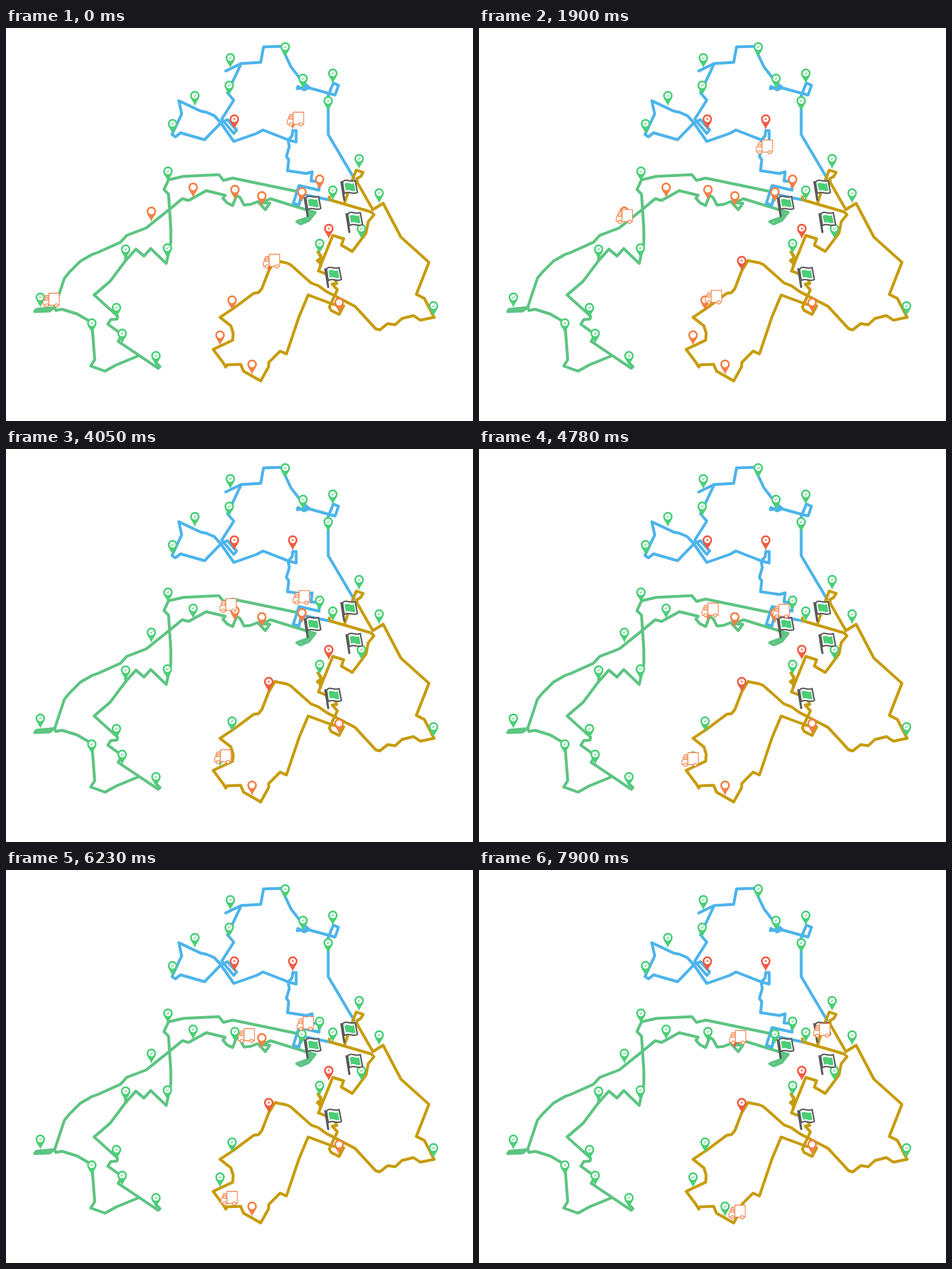
Write an HTML page that moves like this. It is 816 by 686 pixels and loops after 8 s.

```html
<!DOCTYPE html>
<html lang="en">
<head>
<meta charset="utf-8">
<title>Delivery routes</title>
<style>
  html, body { margin: 0; width: 100%; height: 100%; overflow: hidden; background: #fff; }
  svg { display: block; width: 100%; height: 100%; }
  .road { fill: none; stroke-width: 5; stroke-linejoin: round; stroke-linecap: round; }
  .blue { stroke: #4db4eb; }
  .green { stroke: #5ec482; }
  .gold { stroke: #c79c0c; }
  .pin { color: #f47f45; }
  .pin.done { color: #4acf76; }
  .pin.failed { color: #ef5b42; }
  .pin .mark { fill: none; stroke: currentColor; stroke-width: 1.1; visibility: hidden; }
  .pin.done .check, .pin.failed .cross { visibility: visible; }
</style>
</head>
<body>
<svg viewBox="0 0 816 686">
  <defs>
    <g id="body">
      <path fill="currentColor" d="M0 18.500C-1.500 11-8.300 6-8.300 0a8.300 8.300 0 1 1 16.600 0C8.300 6 1.500 11 0 18.500z"/>
      <circle r="5.300" fill="#fff"/>
    </g>
    <g id="flag">
      <path d="M2 1C8-7 16 3 24-2L28 19C20 24 13 15 5 21z" fill="#fff" stroke="#5b5b5b" stroke-width="2.600" stroke-linejoin="round"/>
      <path d="M5.500 4C11-1 16 6 22 3L24.500 16C18 19 13 12 8 16z" fill="#4acf76"/>
      <path d="M0 1 5 32" stroke="#5b5b5b" stroke-width="3.800" stroke-linecap="round"/>
    </g>
    <g id="truck" fill="#fff" stroke="#f47f45" stroke-width="1.300" stroke-linejoin="round">
      <path d="M-4-8H-10L-13 0-14.300 2V9H-4z"/>
      <path d="M-6-5H-9L-11 0H-6z"/>
      <path d="M-4-12H14.200V9H-4z"/>
      <circle cx="-8" cy="9.200" r="2.900"/>
      <circle cx="9" cy="9.200" r="2.900"/>
    </g>
  </defs>

  <g class="road green">
    <path d="M512 286 396 262 380 266 372 256 310 259 284 265 276 282 284 290 288 350V375L280 411 253 385 241 398 227 386 209 406V397"/>
    <path d="M209 406 182 442 154 466 195 503 194 508 183 509 178 517 203 535 196 547 266 594 269 591 262 584"/>
    <path d="M232 572 193 588 173 599 148 590 155 579 150 514 124 499 98 491 87 493 85 487 76 494 50 495 53 491 85 488"/>
    <path d="M85 488 102 437 110 427 130 407 151 395 160 392 200 374 211 362 245 349 285 317 308 298 319 301 350 284"/>
    <path d="M350 284 383 292 379 297 386 305 396 310 403 292 409 296 416 309 427 308 440 303 453 317 461 306 447 305 462 298 540 322"/>
    <path d="M540 322 529 336 515 342 508 338 530 330 526 318 534 326 518 337"/>
  </g>
  <g class="road blue">
    <path d="M608 262 563 186V118L572 96 581 100 575 117 524 103 509 106 510 102 521 108 530 104 519 95 498 68 481 32 450 33 445 60 411 62 384 75"/>
    <path d="M411 62 387 113 398 126 377 159 398 184 403 178 387 160 376 165 347 195 305 183 296 190 290 186 307 150 302 127 340 145 350 147 364 153 375 165"/>
    <path d="M375 165 398 198 438 184 449 178 495 196 507 199V179H501L500 188 493 196 495 207 490 224 494 230 492 249"/>
    <path d="M492 249 525 254 535 251 533 267 547 268V283L512 275 502 306 512 309 516 290 565 300"/>
  </g>
  <g class="road gold">
    <path d="M591 307 604 268 612 248 624 252 620 259 613 263 614 270 641 317 659 306 690 365 739 409 717 465 731 472 748 505"/>
    <path d="M748 505 724 510 712 502 692 507 680 518 667 516 653 527 646 525 610 486 560 460 546 450 533 445 497 413 490 410 470 406"/>
    <path d="M470 406 459 424 447 455 441 462 433 463 398 489 374 505 393 520 397 533 396 545 362 561 380 585 384 592 386 588 410 587 415 599 445 616"/>
    <path d="M445 616 459 591V584L479 564 490 569 512 504 528 466 571 482 590 485 582 500 568 493 565 487 579 457 570 447 578 446 573 435 546 424"/>
    <path d="M546 424 551 412 544 406 551 401 545 391 550 397 549 416 571 362 590 368 586 379 605 390 629 358 633 338 643 326 638 321 566 300 565 295"/>
  </g>
  <g id="pins"></g>
  <use href="#flag" x="586" y="268"/>
  <use href="#flag" x="522" y="296"/>
  <use href="#flag" x="595" y="324"/>
  <use href="#flag" x="558" y="420"/>
  <g id="trucks"></g>
</svg>
<script>
const LOOP = 8000;
const SVG_NS = 'http://www.w3.org/2000/svg';

function add(parent, html, x, y, className = '') {
  const group = document.createElementNS(SVG_NS, 'g');
  group.setAttribute('class', className);
  group.setAttribute('transform', `translate(${x} ${y})`);
  group.innerHTML = html;
  return document.getElementById(parent).appendChild(group);
}

const addPin = (state, x, y) => add('pins',
  `<use href="#body"/><path class="mark check" d="M-2.500-.3-.6 1.600 2.600-1.800"/>
   <path class="mark cross" d="M-1.700-1.700 1.700 1.700M1.700-1.700-1.700 1.700"/>`, x, y, 'pin ' + state);

const addPins = (state, spots) =>
  spots.split(', ').forEach(spot => addPin(state, ...spot.split(' ')));

addPins('done', '488 33, 392 52, 390 100, 330 118, 291 167, 519 88, 571 79, 563 127');
addPins('done', '617 228, 571 283, 652 288, 621 350, 548 376, 747 485');
addPins('done', '283 250, 282 384, 209 386, 193 488, 203 533, 150 515, 262 572, 60 470');
addPins('failed', '399 159, 564 350, 459 406');
addPins('open', '582 479');

// A pin that gets its outcome at a given time
const visit = (x, y, time, outcome) => ({ pin: addPin('open', x, y), time, outcome });
const visits = [
  visit(501, 159, 130, 'failed'),
  visit(254, 320, 2150, 'done'),
  visit(395, 475, 2430, 'done'),
  visit(327, 278, 3400, 'done'),
  visit(548, 264, 3400, 'done'),
  visit(374, 536, 4040, 'done'),
  visit(400, 282, 4870, 'done'),
  visit(517, 286, 5040, 'done'),
  visit(447, 293, 7650, 'failed'),
  visit(430, 587, 7900, 'done')
];

// Each leg runs at an even speed through its points; the truck waits between legs
function addTruck(origin, ...legs) {
  let from = origin;
  const trip = legs.map(([begin, end, points]) => {
    const path = document.createElementNS(SVG_NS, 'path');
    path.setAttribute('d', `M${from} L${points}`);
    from = points.split(' ').slice(-2).join(' ');
    return { begin, end, path, length: path.getTotalLength() };
  });
  return { node: add('trucks', '<use href="#truck"/>', 0, 0), trip };
}

const trucks = [
  addTruck('79 475',
    [130, 230, '91 467'],
    [230, 1140, '106 423 134 393 164 378 174 370'],
    [1200, 1970, '204 360 215 348 249 335 260 322'],
    [2430, 2800, '312 285 321 282'],
    [2800, 3100, '332 280'],
    [3400, 4050, '350 270 384 278 388 273'],
    [4050, 4200, '404 281'],
    [5040, 6230, '420 289'],
    [6230, 7200, '452 292']),
  addTruck('464 407',
    [370, 1140, '451 438 440 444'],
    [1200, 2150, '399 479'],
    [2430, 2800, '379 487'],
    [2800, 3250, '397 502 401 515'],
    [3250, 4050, '400 530 379 537'],
    [4050, 4300, '369 542'],
    [5040, 5840, '386 571'],
    [5960, 6230, '390 573'],
    [6230, 7490, '414 573 419 585 434 593'],
    [7899, 7900, '451 597']),
  addTruck('506 159',
    [130, 230, '508 160'],
    [600, 1140, '502 175'],
    [1200, 1970, '497 182 499 211'],
    [1970, 2150, '497 232'],
    [2150, 2290, '532 234'],
    [2430, 2800, '553 248'],
    [2800, 3100, '552 256'],
    [3400, 4050, '551 268 516 259'],
    [4050, 4500, '510 284 528 283'],
    [5040, 5960, '526 275 523 268'],
    [6230, 6900, '569 286 596 283 599 280'])
];

function place({ node, trip }, time) {
  const leg = trip.findLast(({ begin }) => begin <= time) || trip[0];
  const k = Math.min(1, Math.max(0, (time - leg.begin) / (leg.end - leg.begin)));
  const { x, y } = leg.path.getPointAtLength(leg.length * k);
  node.setAttribute('transform', `translate(${x} ${y})`);
}

const start = performance.now();
function draw(now) {
  const elapsed = Math.max(0, now - start) % LOOP;
  trucks.forEach(truck => place(truck, elapsed));
  visits.forEach(({ pin, time, outcome }) =>
    pin.setAttribute('class', 'pin ' + (elapsed >= time ? outcome : 'open')));
  requestAnimationFrame(draw);
}
draw(start);
</script>
</body>
</html>
```
